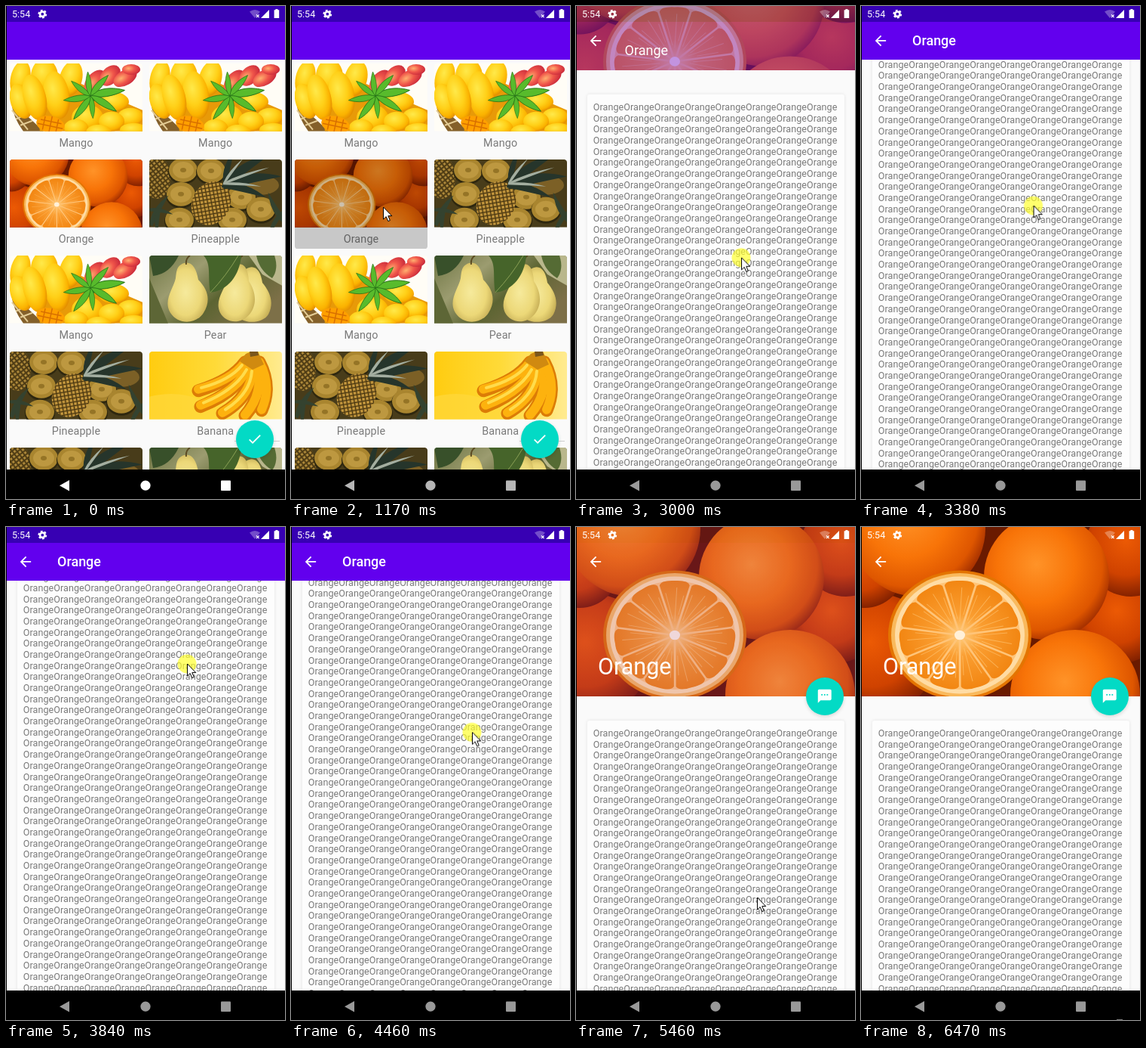
Write an HTML page that moves like this. It is 370 px wide and 652 px high and loops after 6.55 s.

```html
<!DOCTYPE html>
<html lang="en">
<head>
<meta charset="utf-8">
<title>Fruit list</title>
<style>
@property --s { syntax: '<number>'; inherits: true; initial-value: 0; }
html, body { margin: 0; width: 100%; height: 100%; overflow: hidden; background: #000; }
#stage { position: relative; width: 370px; height: 652px; overflow: hidden; background: #fafafa; font-family: Roboto, sans-serif; }
#stage div, #stage > svg, .detail > svg { position: absolute; }
svg { display: block; overflow: visible; }
.full { left: 0; top: 0; width: 370px; height: 652px; }
.anim { animation: 6550ms linear infinite; }

.bar { left: 0; top: 0; width: 370px; height: 50px; border-top: 21px solid #3700b3; background: #6200ee; }
.cell { width: 176px; height: 118px; border-radius: 3.6px; overflow: hidden; font-size: 14.35px; line-height: 17px; letter-spacing: .15px; color: #7a7a7a; text-align: center; }
.cell svg { margin-bottom: 6.9px; overflow: hidden; border-radius: 3.6px 3.6px 0 0; }
.press { inset: 0; background: rgba(0, 0, 0, .2); animation-name: press; }
@keyframes press { 0%, 11.6% { opacity: 0 } 14%, 100% { opacity: 1 } }

/* --s is the distance scrolled; the header gives way for the first 153 px */
.detail { --fold: min(var(--s), 153); --f: calc(var(--fold) / 153); background: #fafafa; animation-name: open, scroll; }
@keyframes open {
  0%, 20% { opacity: 0; transform: translateY(52px); animation-timing-function: cubic-bezier(.1, .7, .3, 1) }
  23.05% { opacity: 1; transform: translateY(9px); animation-timing-function: ease-out }
  25.3%, 100% { opacity: 1; transform: none }
}
@keyframes scroll {
  0%, 34.96% { --s: 0 }
  45.8% { --s: 139 }
  58.6%, 64.6% { --s: 294.8 }
  76.3% { --s: 26 }
  77.5%, 100% { --s: 0 }
}
.card { left: 15px; top: 256px; width: 341px; height: 720px; border-radius: 3px; background: #fdfdfd; box-shadow: 0 0 4px rgba(0, 0, 0, .1); transform: translateY(calc(var(--s) * -1px)); }
.lines { left: 7.8px; top: 10px; font-size: 12.556px; line-height: 14.69px; letter-spacing: .06px; color: #7a7a7a; white-space: pre; }
.header { left: 0; top: 0; width: 370px; height: calc(224px - var(--fold) * 1px); overflow: hidden; }
.header svg { transform: translateY(calc(var(--fold) * -.5px)); }
.scrim { left: 0; top: 0; animation-name: scrim; }
@keyframes scrim { 0%, 42.29% { opacity: 0 } 51.45%, 75.1% { opacity: 1 } 84.3%, 100% { opacity: 0 } }
.scrim .bar { height: 203px; }
.title {
  fill: #fff; animation-name: weight;
  font-size: calc(30.5px - 12.55px * (1 - (1 - var(--f)) * (1 - var(--f))));
  transform: translate(calc(29px + 39px * var(--f)), calc(195px - 143px * var(--f)));
}
@keyframes weight {
  0%, 100% { font-weight: 400; animation-timing-function: step-end }
  47% { font-weight: 500; animation-timing-function: step-end }
  70.8% { font-weight: 400; animation-timing-function: step-end }
}
.fab { left: 305px; top: 548px; width: 50px; height: 50px; border-radius: 50%; background: #03dac5; box-shadow: 0 2px 5px rgba(0, 0, 0, .14); }
.fab svg { margin: 14.25px; }
.detail .fab { top: calc(199px - var(--fold) * 1px); animation-name: fab; }
@keyframes fab {
  0%, 42.3% { scale: 1; opacity: 1 }
  45%, 73.9% { scale: 0; opacity: 0 }
  76.8%, 100% { scale: 1; opacity: 1 }
}

.nav { animation-name: dim; }
@keyframes dim { 0%, 1.07% { fill: #fff } 17.86% { fill: #b6b6b6 } 31.8%, 100% { fill: #999 } }
.pointer { animation-name: move; }
@keyframes move {
  0%, 1.06% { transform: translate(230px, 590px); opacity: 0 }
  1.07% { transform: translate(230px, 590px); opacity: 1; animation-timing-function: ease-in-out }
  8.4%, 25% { transform: translate(122px, 266px); opacity: 1; animation-timing-function: ease-in-out }
  31.8%, 34.05% { transform: translate(197px, 484px) }
  45.8% { transform: translate(219px, 333px) }
  58.63%, 64.2% { transform: translate(240px, 181px) }
  76.3% { transform: translate(240px, 461px) }
  77.6%, 85.65% { transform: translate(240px, 490px); animation-timing-function: ease-in }
  94.5% { transform: translate(344px, 660px); opacity: 1 }
  94.6%, 100% { transform: translate(344px, 660px); opacity: 0 }
}
.halo { fill: #ffff28; fill-opacity: .68; animation-name: halo; animation-timing-function: step-end; }
@keyframes halo {
  0% { opacity: 0 } 8.8% { opacity: 1 } 11.6% { opacity: 0 }
  32.8% { opacity: 1 } 61% { opacity: 0 } 64.5% { opacity: 1 } 80%, 100% { opacity: 0 }
}
.speck { animation-name: speck; animation-timing-function: step-end; }
@keyframes speck { 0% { opacity: 0 } 98.77%, 100% { opacity: 1 } }
</style>
</head>
<body>
<svg width="0" height="0" style="position:absolute">
  <defs>
    <radialGradient id="peel" cx=".42" cy=".4" r=".62"><stop offset="0" stop-color="#ff9328"/><stop offset=".5" stop-color="#f87408"/><stop offset=".85" stop-color="#de5600"/><stop offset="1" stop-color="#a83200"/></radialGradient>
    <radialGradient id="peelDark" cx=".45" cy=".4" r=".62"><stop offset="0" stop-color="#ec5a04"/><stop offset=".6" stop-color="#cf4200"/><stop offset="1" stop-color="#7e1f00"/></radialGradient>
    <radialGradient id="flesh" gradientUnits="userSpaceOnUse" cx="0" cy="0" r="80"><stop offset="0" stop-color="#ffcf80"/><stop offset=".4" stop-color="#fa9d30"/><stop offset="1" stop-color="#f28612"/></radialGradient>
    <radialGradient id="gold" cx=".4" cy=".35" r=".7"><stop offset="0" stop-color="#ffe94a"/><stop offset=".5" stop-color="#ffd018"/><stop offset=".8" stop-color="#fbb200"/><stop offset="1" stop-color="#dd8400"/></radialGradient>
    <radialGradient id="blush" cx=".35" cy=".4" r=".75"><stop offset="0" stop-color="#ffb070"/><stop offset=".45" stop-color="#f0564a"/><stop offset="1" stop-color="#c02038"/></radialGradient>
    <radialGradient id="cream" cx=".45" cy=".5" r=".65"><stop offset="0" stop-color="#f6ea9c"/><stop offset=".6" stop-color="#ecd878"/><stop offset="1" stop-color="#b9a04a"/></radialGradient>
    <linearGradient id="sun" x2="1"><stop offset="0" stop-color="#ffcc10"/><stop offset=".5" stop-color="#ffda38"/><stop offset="1" stop-color="#ffeb90"/></linearGradient>
    <linearGradient id="grove" x2="1" y2=".6"><stop offset="0" stop-color="#6d7442"/><stop offset=".35" stop-color="#9c9c70"/><stop offset=".65" stop-color="#5c6432"/><stop offset="1" stop-color="#7d7048"/></linearGradient>
    <pattern id="scales" width="5" height="5" patternUnits="userSpaceOnUse" patternTransform="rotate(52)"><path d="M0 0H5M0 0V5" stroke="#40310f" stroke-width="2"/><circle cx="3" cy="3" r=".9" fill="#d8ad4c"/></pattern>
    <path id="leaf" d="M0 0C10-9 27-8 40-3 27 3 10 4 0 0Z"/>
    <path id="blade" d="M0 0Q20-10 46-1 20 2 0 5Z"/>
    <g id="ring"><ellipse rx="20" ry="17" cy="2" fill="#2e270f"/><ellipse rx="19" ry="16" fill="#a9852f"/><ellipse rx="14" ry="11" fill="#bd9840"/><ellipse rx="4" ry="3" fill="#957426"/></g>

    <symbol id="Orange" viewBox="0 0 370 224" preserveAspectRatio="xMidYMid slice">
      <path fill="#6a1a00" d="M0 0H370V224H0Z"/>
      <g fill="url(#peelDark)"><circle cx="20" cy="168" r="80"/><circle cx="345" cy="122" r="58"/><circle cx="358" cy="30" r="62"/><circle cx="5" cy="55" r="52"/></g>
      <g fill="url(#peel)"><circle cx="75" cy="2" r="90"/><circle cx="246" cy="66" r="83"/><circle cx="284" cy="222" r="86"/></g>
      <g transform="translate(131 143) scale(1 .9)">
        <circle r="95" fill="#e47400"/><circle r="91" fill="#f9b95c"/><circle r="86" fill="#ffdca4"/><circle r="80" fill="#ffc478"/>
        <g id="segments"></g>
        <circle r="7" fill="#fff0d8"/>
      </g>
    </symbol>
    <symbol id="Mango" viewBox="0 0 176 90" preserveAspectRatio="none">
      <path fill="#fffdf6" d="M0 0H176V90H0Z"/>
      <path d="M2 50L45 90H18Q4 72 2 50Z" fill="#84602a"/><path d="M3 62L24 88M8 74L20 68M14 82L30 76" stroke="#e3cb94" stroke-width="2"/>
      <path d="M30 20L90 25 176 62V90H40Z" fill="#e89a08"/>
      <g fill="url(#blush)"><ellipse cx="113" cy="24" rx="18" ry="11" transform="rotate(-50 113 24)"/><ellipse cx="133" cy="16" rx="16" ry="11" transform="rotate(-45 133 16)"/><ellipse cx="153" cy="19" rx="17" ry="10" transform="rotate(-30 153 19)"/><ellipse cx="161" cy="8" rx="12" ry="7"/></g>
      <g fill="url(#gold)">
        <ellipse cx="81" cy="20" rx="15" ry="24" transform="rotate(14 81 20)"/><ellipse cx="14" cy="20" rx="13" ry="24" transform="rotate(12 14 20)"/><ellipse cx="46" cy="17" rx="18" ry="23"/>
        <ellipse cx="15" cy="50" rx="14" ry="24" transform="rotate(-18 15 50)"/><ellipse cx="62" cy="42" rx="17" ry="32" transform="rotate(-10 62 42)"/><ellipse cx="33" cy="45" rx="15" ry="31" transform="rotate(-14 33 45)"/>
        <ellipse cx="138" cy="51" rx="20" ry="13"/><ellipse cx="103" cy="72" rx="21" ry="17"/><ellipse cx="160" cy="71" rx="17" ry="12"/><ellipse cx="135" cy="77" rx="17" ry="13"/><ellipse cx="88" cy="85" rx="16" ry="11"/><ellipse cx="164" cy="88" rx="18" ry="9"/><ellipse cx="118" cy="91" rx="17" ry="10"/>
      </g>
      <g transform="translate(54 81) rotate(12)"><ellipse rx="19" ry="11" fill="#ffa000"/><path d="M-14-4H14M-17 2H17M-9-9V9M0-11V11M9-9V9" stroke="#d87000" stroke-width="1.5"/></g>
      <g transform="translate(107 43)" fill="#58bb2c" stroke="#256f18" stroke-width=".8">
        <circle r="8" fill="#2c6d1a"/>
        <use href="#leaf" transform="rotate(-5) scale(1.15)"/><use href="#leaf" transform="rotate(35)"/><use href="#leaf" transform="rotate(88) scale(.75)"/><use href="#leaf" transform="rotate(130) scale(.95)"/><use href="#leaf" transform="rotate(175) scale(.9)"/><use href="#leaf" transform="rotate(222) scale(.8)"/><use href="#leaf" transform="rotate(268) scale(.8)"/><use href="#leaf" transform="rotate(315) scale(.9)"/>
      </g>
    </symbol>
    <symbol id="Pineapple" viewBox="0 0 176 90" preserveAspectRatio="none">
      <path fill="#483c1a" d="M0 0H176V90H0Z"/>
      <g fill="#7c6026"><ellipse cx="10" cy="24" rx="18" ry="28"/><ellipse cx="148" cy="34" rx="24" ry="13"/></g><ellipse cx="10" cy="24" rx="18" ry="28" fill="url(#scales)"/>
      <use href="#ring" x="45" y="14"/><use href="#ring" x="82" y="15"/><use href="#ring" x="42" y="46"/><use href="#ring" x="122" y="50"/><use href="#ring" x="148" y="66"/><use href="#ring" x="110" y="80"/><use href="#ring" x="40" y="80"/>
      <g fill="#34422f"><use href="#blade" transform="translate(0 86) rotate(-55)"/><use href="#blade" transform="translate(8 90) rotate(-75) scale(.8)"/><use href="#blade" transform="translate(178 85) rotate(-115)"/><use href="#blade" transform="translate(160 92) rotate(-50) scale(.8)"/><use href="#blade" transform="translate(0 65) rotate(15) scale(.7)"/></g>
      <g transform="rotate(28 82 58)"><ellipse cx="82" cy="58" rx="25" ry="30" fill="#a97f30"/><ellipse cx="82" cy="58" rx="25" ry="30" fill="url(#scales)"/></g>
      <g transform="translate(98 31)"><g fill="#26352b"><use href="#blade" transform="rotate(-70)"/><use href="#blade" transform="rotate(20) scale(1.3)"/><use href="#blade" transform="rotate(-30) scale(1.6)"/><use href="#blade" transform="rotate(-5) scale(1.7)"/></g><g fill="#a3aea0"><use href="#blade" transform="rotate(-50) scale(.9 .5)"/><use href="#blade" transform="rotate(-18) scale(1.4 .5)"/><use href="#blade" transform="rotate(6) scale(1.1 .5)"/></g></g>
    </symbol>
    <symbol id="Pear" viewBox="0 0 176 90" preserveAspectRatio="none">
      <path fill="url(#grove)" d="M0 0H176V90H0Z"/>
      <path d="M132 0H176V40L150 25Z" fill="#b9b78c"/><path d="M0 30L25 90H0Z" fill="#5d6636"/>
      <g fill="url(#cream)"><path d="M128 18C140 10 148 20 150 36 160 48 166 62 158 78 150 92 118 92 115 75Z"/><path d="M42 12C54 5 62 14 65 32 78 45 82 60 72 76 62 92 38 92 28 76 18 60 32 44 35 30 36 22 36 16 42 12Z"/><path d="M113 14C124 7 131 15 132 34 142 48 143 66 133 78 121 92 102 90 94 76 86 60 100 44 105 30Z"/></g>
      <path d="M49 12Q48 4 54 0M119 12Q118 4 124 0" stroke="#5b4b22" stroke-width="2" fill="none"/>
      <path d="M72 0H122C120 26 104 47 81 49 77 29 83 12 72 0Z" fill="#46642a"/><path d="M118 0Q102 27 81 49" stroke="#8ba056" fill="none"/><path d="M0 0H39Q27 25 5 27Z" fill="#38502a"/><path d="M142 0H166Q172 18 163 30 146 20 142 0Z" fill="#556b34"/>
    </symbol>
    <symbol id="Banana" viewBox="0 0 176 90" preserveAspectRatio="none">
      <path fill="url(#sun)" d="M0 0H176V90H0Z"/>
      <path d="M0 60Q60 45 105 90H0Z" fill="#ffd93c" opacity=".7"/>
      <g transform="translate(-5)" fill="none" stroke-linecap="round"><g stroke="#dc7c06" stroke-width="17"><path d="M132 14Q115 38 70 52"/><path d="M137 17Q125 52 73 73"/><path d="M143 17Q142 59 102 82"/><path d="M148 15Q158 55 132 85"/><path d="M151 14Q168 46 154 78"/></g>
      <g stroke="#fdb20e" stroke-width="12"><path d="M132 14Q115 38 70 50"/><path d="M137 17Q125 52 73 71"/><path d="M143 17Q142 59 102 81"/><path d="M148 15Q158 55 132 84"/><path d="M151 14Q168 46 154 77"/></g>
      <g stroke="#ffdc4c" stroke-width="4"><path d="M128 18Q112 38 74 48"/><path d="M134 24Q120 50 77 68"/><path d="M141 26Q139 56 106 77"/></g></g>
      <path d="M120 13L128 3 135 0H144L152 17 137 24Z" fill="#d08a10"/><path d="M133 0H144L145 5 134 7Z" fill="#7a561c"/>
    </symbol>
  </defs>
</svg>

<div id="stage">
  <div id="list" class="full">
    <div class="bar"></div>
    <div style="left:303px;top:575px;width:60px;height:1px;background:#cfcfcf"></div>
    <div class="fab"><svg width="21.5" height="21.5" viewBox="0 0 24 24"><path fill="#fff" d="M9 16.17L4.83 12l-1.42 1.41L9 19 21 7l-1.41-1.41z"/></svg></div>
  </div>

  <div class="detail full anim">
    <div class="card"><div class="lines"></div></div>
    <div class="header">
      <svg width="370" height="224"><use href="#Orange" width="370" height="224"/></svg>
      <div class="scrim anim"><div class="bar"></div></div>
    </div>
    <svg class="full">
      <text class="title anim">Orange</text>
      <path fill="#fff" transform="translate(15.2 35.2) scale(.897)" d="M20 11H7.83l5.59-5.59L12 4l-8 8 8 8 1.41-1.41L7.83 13H20z"/>
    </svg>
    <div class="fab anim"><svg width="21.5" height="21.5" viewBox="0 0 24 24"><path fill="#fff" d="M20 2H4c-1.1 0-2 .9-2 2v18l4-4h14c1.1 0 2-.9 2-2V4c0-1.1-.9-2-2-2zM9 11H7V9h2zm4 0h-2V9h2zm4 0h-2V9h2z"/></svg></div>
  </div>

  <svg class="full" viewBox="0 0 370 652">
    <g fill="#fff">
      <text x="8" y="15.2" font-size="12.56">5:54</text>
      <circle cx="48.3" cy="10.7" r="3.2" fill="none" stroke="#fff" stroke-width="2.6"/>
      <circle cx="48.3" cy="10.7" r="5" fill="none" stroke="#fff" stroke-width="1.8" pathLength="12" stroke-dasharray="1.1 .9"/>
      <path opacity=".3" d="M323 7.5Q330 2.5 337 7.5L330 16Z"/>
      <path d="M332 11.5l3.6 3.6m0-3.6l-3.6 3.6" stroke="#fff" stroke-width="1.2"/>
      <path d="M349 5V16H338Z"/>
      <path d="M357.4 4h3v1.3h1.8V16h-6.6V5.3h1.8Z"/>
    </g>
    <path d="M0 0H1V652H0ZM0 613H370V652H0Z"/>
    <g class="nav anim"><path d="M71 634.2L84 627V641.4Z"/><circle cx="185" cy="634.2" r="6.6"/><rect x="285" y="627.6" width="13" height="13.4" rx="1"/></g>
    <path class="speck anim" fill="#777" d="M339 651h8v1h-8z"/>
    <g class="pointer anim">
      <circle class="halo anim" r="12.5"/>
      <path d="M.5 0V16L4.2 12.6 6.8 18.6 9.3 17.5 6.8 11.6H11.8Z" fill="#fff" stroke="#000"/>
    </g>
  </svg>
</div>

<script>
const fruits = 'Mango Mango Orange Pineapple Mango Pear Pineapple Banana Pineapple Pear'.split(' ');
const cells = fruits.map((name, i) => {
  const x = i % 2 ? 189.7 : 5, y = 76 + 127 * (i >> 1);
  const press = i === 2 ? '<div class="press anim"></div>' : '';
  return `<div class="cell" style="left:${x}px;top:${y}px">
    <svg width="176" height="89.7"><use href="#${name}" width="176" height="89.7"/></svg>${name}${press}</div>`;
});
document.querySelector('#list').insertAdjacentHTML('afterbegin', cells.join(''));
document.querySelector('.lines').textContent = Array(46).fill('Orange'.repeat(8)).join('\n');

const segments = 11;
document.querySelector('#segments').innerHTML = Array.from({ length: segments }, (_, i) => `
  <g transform="rotate(${i * 360 / segments + 8})">
    <path fill="url(#flesh)" d="M5 0L73-20Q81-18 80 0 81 18 73 20Z"/>
    <path stroke="#ffc878" opacity=".6" d="M24-3L62-12M20 0L70 3M30 5L58 12"/>
  </g>`).join('');
</script>
</body>
</html>
```
